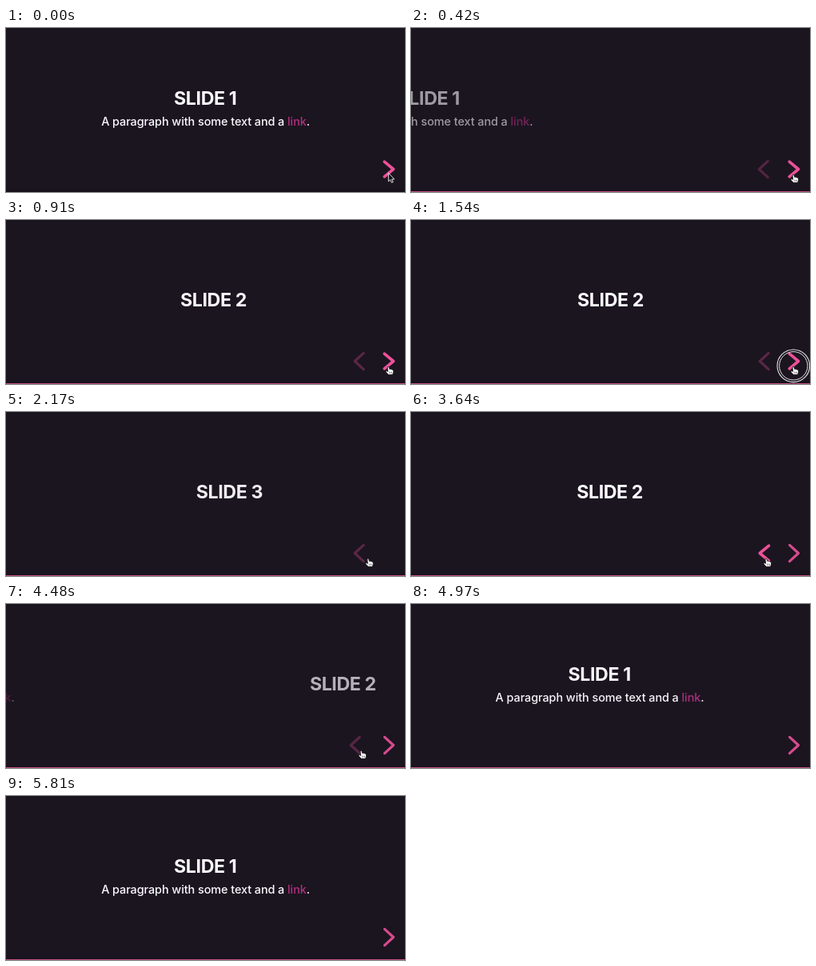
These frames come from a looping animation (499 px wide and 205 px high, 5880 ms). An HTML page:

```html
<!DOCTYPE html>
<html lang="en">
<head>
<meta charset="utf-8">
<title>Slides</title>
<style>
  html, body { margin: 0; width: 100%; height: 100%; overflow: hidden; background: #1b1520; }
  svg { display: block; width: 499px; height: 205px; }
  text { font-family: Inter, "Liberation Sans", sans-serif; font-size: 14.4px; font-weight: 500; letter-spacing: -.06px; fill: #fcfbff; text-anchor: middle; }
  .title { font-size: 23.2px; font-weight: 700; letter-spacing: -.4px; }
  .link { fill: #b0307f; }
  .arrow { fill: none; stroke: #ec5199; stroke-linecap: round; stroke-linejoin: round; }
  .ring { fill: none; stroke: #e4e2e5; }
</style>
</head>
<body>
<svg viewBox="0 0 499 205">
  <rect width="499" height="205" fill="#1b1520"/>
  <rect y="202" width="499" height="3" fill="#17121b"/>
  <rect id="bar" y="204" width="499" height="1" fill="#bf5080"/>
  <g class="slide">
    <text class="title" x="249.2" y="96.4">SLIDE 1</text>
    <text x="249.6" y="122.2">A paragraph with some text and a <tspan class="link">link</tspan>.</text>
  </g>
  <g class="slide"><text class="title" x="249.5" y="107.6">SLIDE 2</text></g>
  <g class="slide"><text class="title" x="249.5" y="107.6">SLIDE 3</text></g>
  <path id="prev" class="arrow"/>
  <path id="next" class="arrow"/>
  <g id="cursor">
    <g id="ring" class="ring">
      <circle r="20.3" stroke-width="1.1"/>
      <circle r="17.7" stroke-width="1"/>
    </g>
    <path id="pointer" d="M0 -1V9.6L2.4 7.4L4 11L5.8 10.2L4.2 6.7H7.4Z"
      fill="#141016" stroke="#f4f4f4" stroke-width=".9"/>
    <g id="hand" stroke="#111" stroke-width=".8">
      <path d="M-1.3 1.7Q-.2 .2 .8 1.7L1.4 4.2Q2.4 3.5 3.1 4.4Q4.1 3.9 4.7 4.9Q6 4.7 6.2 6V8.4L5.2 11H0L-3.2 7.7Q-3.7 6.2 -2.2 6.2L-.6 7.2Z" fill="#fff"/>
      <path d="M1.3 7.4V9.4M2.8 7.4V9.4M4.2 7.4V9.4" stroke-width=".5"/>
    </g>
  </g>
</svg>
<script>
const LOOP = 5880, STEP = 70, GAP = 541;
const PRESSES = [[70, 304], [1540, 1690], [2730, 2879], [4200, 4396]];
const [FIRST, SECOND, THIRD, FOURTH] = PRESSES.map(p => p[1]);

const $ = id => document.getElementById(id);
const slides = [...document.querySelectorAll('.slide')];

function bezier(x1, y1, x2, y2) {
  const at = (a, b, u) => 3 * (1 - u) ** 2 * u * a + 3 * (1 - u) * u * u * b + u ** 3;
  return x => {
    let lo = 0, hi = 1;
    for (let i = 0; i < 24; i++) {
      const mid = (lo + hi) / 2;
      if (at(x1, x2, mid) < x) lo = mid; else hi = mid;
    }
    return at(y1, y2, lo);
  };
}
const ease = bezier(.25, .1, .25, 1);
const glide = bezier(.26, .86, .44, .985);

// Each change is [start, end value]; all share one duration and easing.
function track(t, value, changes, duration = 200, easing = ease) {
  for (const [start, to] of changes) {
    if (t <= start) break;
    value += (to - value) * easing(Math.min(1, (t - start) / duration));
  }
  return value;
}

// Straight-line interpolation through [time, value] points.
function through(t, points) {
  const i = points.findIndex(p => p[0] > t);
  if (i < 0) return points[points.length - 1][1];
  if (i === 0) return points[0][1];
  const [t0, a] = points[i - 1], [t1, b] = points[i];
  return a + (b - a) * (t - t0) / (t1 - t0);
}

function drawArrow(el, tip, dir, hover, opacity) {
  const dx = 11 + .3 * hover, dy = 10.1 - .7 * hover, back = tip - dir * dx;
  el.setAttribute('d', `M${back} ${176.5 - dy}L${tip} 176.5L${back} ${176.5 + dy}`);
  el.style.strokeWidth = 3.2 + .4 * hover;
  el.style.opacity = opacity;
}

const show = (el, on) => { el.style.display = on ? '' : 'none'; };

function render(t) {
  const page = track(t, 0, [[FIRST, 1], [SECOND, 2], [THIRD, 1], [FOURTH, 0]], 800, glide);
  slides.forEach((slide, i) => {
    const away = i - page;
    slide.setAttribute('transform', `translate(${away * GAP} 0)`);
    slide.style.opacity = Math.max(0, 1 - Math.abs(away));
  });

  drawArrow($('prev'),
    436.2 + track(t, -7, [[FIRST, 0], [FOURTH, -7]]), -1,
    track(t, 0, [[2180, 1], [FOURTH, 0]]),
    track(t, 0, [[FIRST, .31], [2180, 1], [FOURTH, 0]]));
  drawArrow($('next'),
    484.5 + track(t, 0, [[SECOND, 7], [THIRD, 0]]), 1,
    track(t, 1, [[SECOND, 0]]),
    track(t, 1, [[SECOND, 0], [THIRD, .9]]));

  const x = through(t, [[1890, 478.3], [2030, 472], [2100, 462], [2170, 453], [2310, 446], [2450, 444.3]]);
  $('cursor').setAttribute('transform', `translate(${x} 182.3)`);
  show($('cursor'), t < 4620);
  show($('pointer'), t < 70);
  show($('hand'), t >= 70);
  show($('ring'), PRESSES.some(([down, up]) => t >= down && t < up));
  show($('bar'), t >= 70);
}

function tick() {
  const t = performance.now() % LOOP;
  render(Math.floor(t / STEP) * STEP);
  requestAnimationFrame(tick);
}
tick();
</script>
</body>
</html>
```
